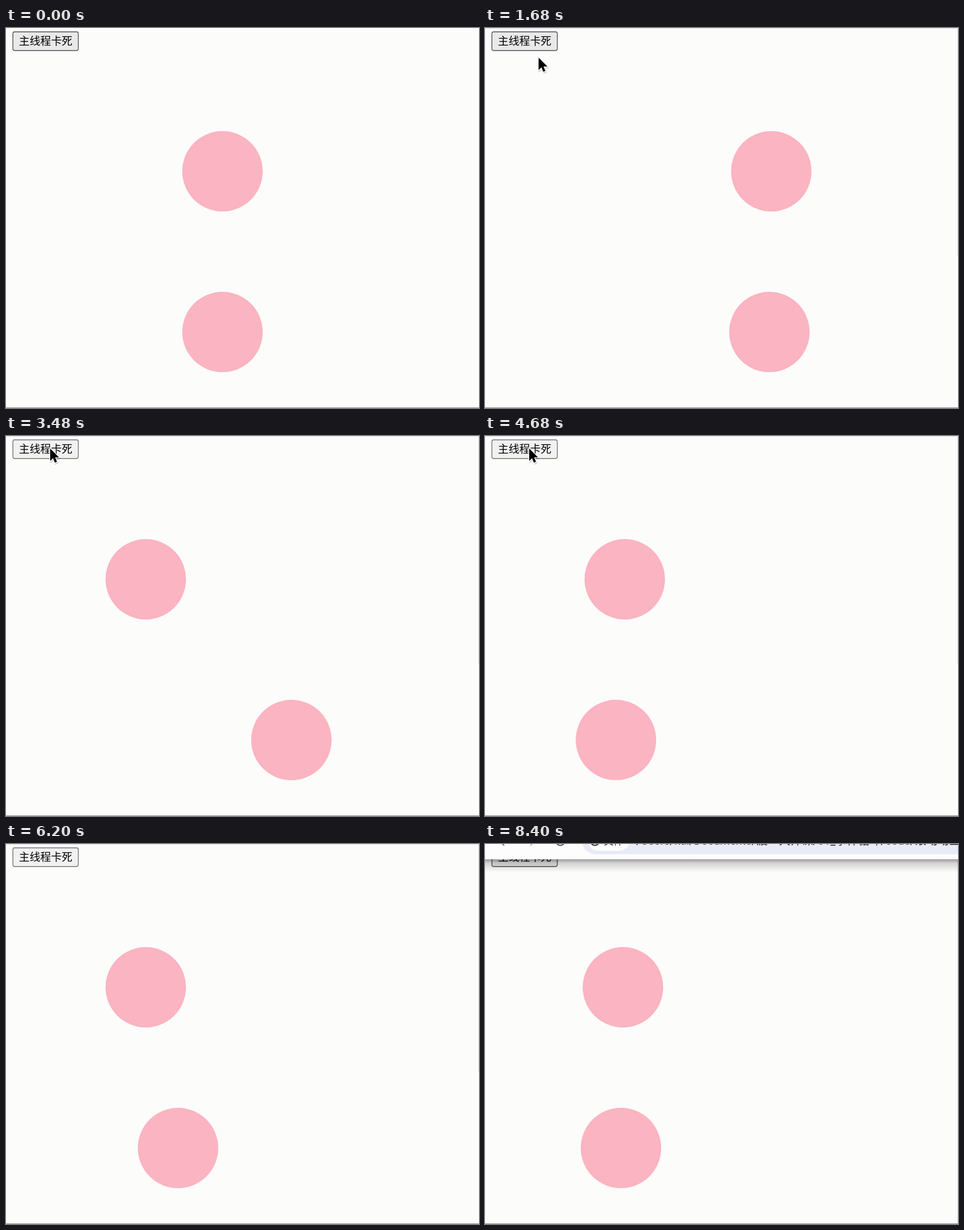
An HTML page that plays this animation: 835 by 671 pixels, repeating every 8.44 s.

```html
<!DOCTYPE html>
<html lang="zh-CN">
<head>
<meta charset="utf-8">
<title>主线程卡死</title>
<style>
  html, body { margin: 0; width: 100%; height: 100%; overflow: hidden; background: #fcfcfb; }
  svg { display: block; width: 835px; height: 671px; }
  text { font-family: Roboto, "Noto Sans CJK SC", "Noto Sans CJK", sans-serif; }
</style>
</head>
<body>
<svg viewBox="0 0 835 671">
  <defs>
    <linearGradient id="shade" x1="0" y1="0" x2="0" y2="1">
      <stop offset="0" stop-color="#000" stop-opacity=".38"/>
      <stop offset=".3" stop-color="#000" stop-opacity=".16"/>
      <stop offset="1" stop-color="#000" stop-opacity="0"/>
    </linearGradient>
  </defs>
  <rect width="835" height="671" fill="#fcfcfb"/>
  <g id="edges" fill="#d9d9d9">
    <rect width="835" height="1"/>
    <rect id="side" x="834" width="1"/>
  </g>
  <rect y="670" width="835" height="1" fill="#858583"/>

  <rect id="button" x="12.2" y="6.7" width="115.4" height="33" rx="3.2" stroke-width="1.4"/>
  <text x="70" y="30.2" font-size="18.9" text-anchor="middle">主线程卡死</text>

  <g fill="#fbb4c1">
    <circle id="blocked" cy="253" r="71"/>
    <circle id="smooth" cy="536.8" r="71"/>
  </g>

  <g id="toolbar">
    <rect y="27" width="835" height="23" fill="url(#shade)"/>
    <rect width="835" height="27" fill="#fdfdfd"/>
    <path d="M170-8A26 26 0 0 0 196 18H835V-8Z" fill="#e8ebf8"/>
    <rect x="181" y="-26" width="75" height="38" rx="19" fill="#fdfdfd"/>
    <g fill="none" stroke-width="2">
      <path d="M34 3L25-6" stroke="#777"/>
      <path d="M80 3L89-6" stroke="#bbb"/>
      <circle cx="133" cy="-5" r="7.5" stroke="#444"/>
      <circle cx="194" cy="-5" r="7.5" stroke="#222"/>
    </g>
    <g font-size="20" fill="#222">
      <text x="210" y="1" font-size="17">文件</text>
      <text x="267" y="1">/Users/kai/Documents/渡一大师课/01_事件循环/code/滚动动画.html</text>
    </g>
  </g>

  <g id="cursor" stroke-linejoin="round">
    <path d="M0 0V22L5 17.3 8.3 25 12 23.4 8.8 15.8H15.6Z" transform="translate(1 2)" fill="#000" stroke="#000" stroke-width="3" opacity=".15"/>
    <path d="M0 0V22L5 17.3 8.3 25 12 23.4 8.8 15.8H15.6Z" stroke="#fff" stroke-width="2.6" paint-order="stroke"/>
  </g>
</svg>
<script>
const LOOP = 8440, STEP = 40;
const PRESS = 2400, RELEASE = 7400, REVEAL = 6500;
const START_PHASE = 1.467, BLOCKED_PHASE = 3.802;
const $ = id => document.getElementById(id);
const clamp = v => Math.min(1, Math.max(0, v));
const smoothstep = v => v * v * (3 - 2 * v);

// cubic-bezier(.42, 0, .58, 1), solved by bisection
function easeInOut(x) {
  let lo = 0, hi = 1;
  for (let i = 0; i < 24; i++) {
    const s = (lo + hi) / 2, r = 1 - s;
    if (1.26 * s * r * r + 1.74 * s * s * r + s * s * s < x) lo = s; else hi = s;
  }
  return smoothstep(lo);
}

// Alternating one-second swing; phase counts seconds
function ballX(phase) {
  const p = phase % 2;
  return 224 + 284 * easeInOut(p < 1 ? p : 2 - p);
}

const cursorPath = [
  [400, 528, 330], [960, 241, 240], [1900, 71, 22],
  [2440, 71, 22], [2720, 78, 22], [6040, 78, 22], [6200, 80, 2]
];

function cursorAt(t) {
  if (t < cursorPath[0][0] || t >= cursorPath.at(-1)[0]) return null;
  const i = cursorPath.findIndex(p => p[0] > t);
  const [t0, x0, y0] = cursorPath[i - 1], [t1, x1, y1] = cursorPath[i];
  const k = smoothstep((t - t0) / (t1 - t0));
  return { x: x0 + (x1 - x0) * k, y: y0 + (y1 - y0) * k };
}

function buttonColors(stuck, cursor) {
  if (stuck) return ["#f1f1f1", "#747474"];
  const hovered = cursor && cursor.x > 12 && cursor.x < 128 && cursor.y < 40;
  return hovered ? ["#dcdcdc", "#3c3c3c"] : ["#e9e9e9", "#505050"];
}

function draw(t) {
  const stuck = t >= PRESS && t < RELEASE;
  const phase = t / 1000 + (t < PRESS ? 1.423 : 1.433);
  const lag = t < PRESS ? 0.034 : 0.017;
  const mainPhase = stuck ? Math.min(BLOCKED_PHASE, phase - lag) : phase - lag;
  $("smooth").setAttribute("cx", ballX(Math.max(START_PHASE, phase)));
  $("blocked").setAttribute("cx", ballX(Math.max(START_PHASE, mainPhase)));

  const cursor = cursorAt(t);
  $("cursor").style.display = cursor ? "" : "none";
  if (cursor) $("cursor").setAttribute("transform", `translate(${cursor.x} ${cursor.y})`);

  const [fill, stroke] = buttonColors(stuck, cursor);
  $("button").setAttribute("fill", fill);
  $("button").setAttribute("stroke", stroke);

  $("edges").style.display = t < 920 ? "none" : "";
  $("side").setAttribute("height", t < REVEAL ? 402 : 671);
  const shown = smoothstep(clamp((t - REVEAL) / 320));
  $("toolbar").setAttribute("transform", `translate(0 ${-52 * (1 - shown)})`);
}

const begin = performance.now();
function tick() {
  const t = (performance.now() - begin) % LOOP;
  draw(Math.floor(t / STEP) * STEP);
  requestAnimationFrame(tick);
}
tick();
</script>
</body>
</html>
```
